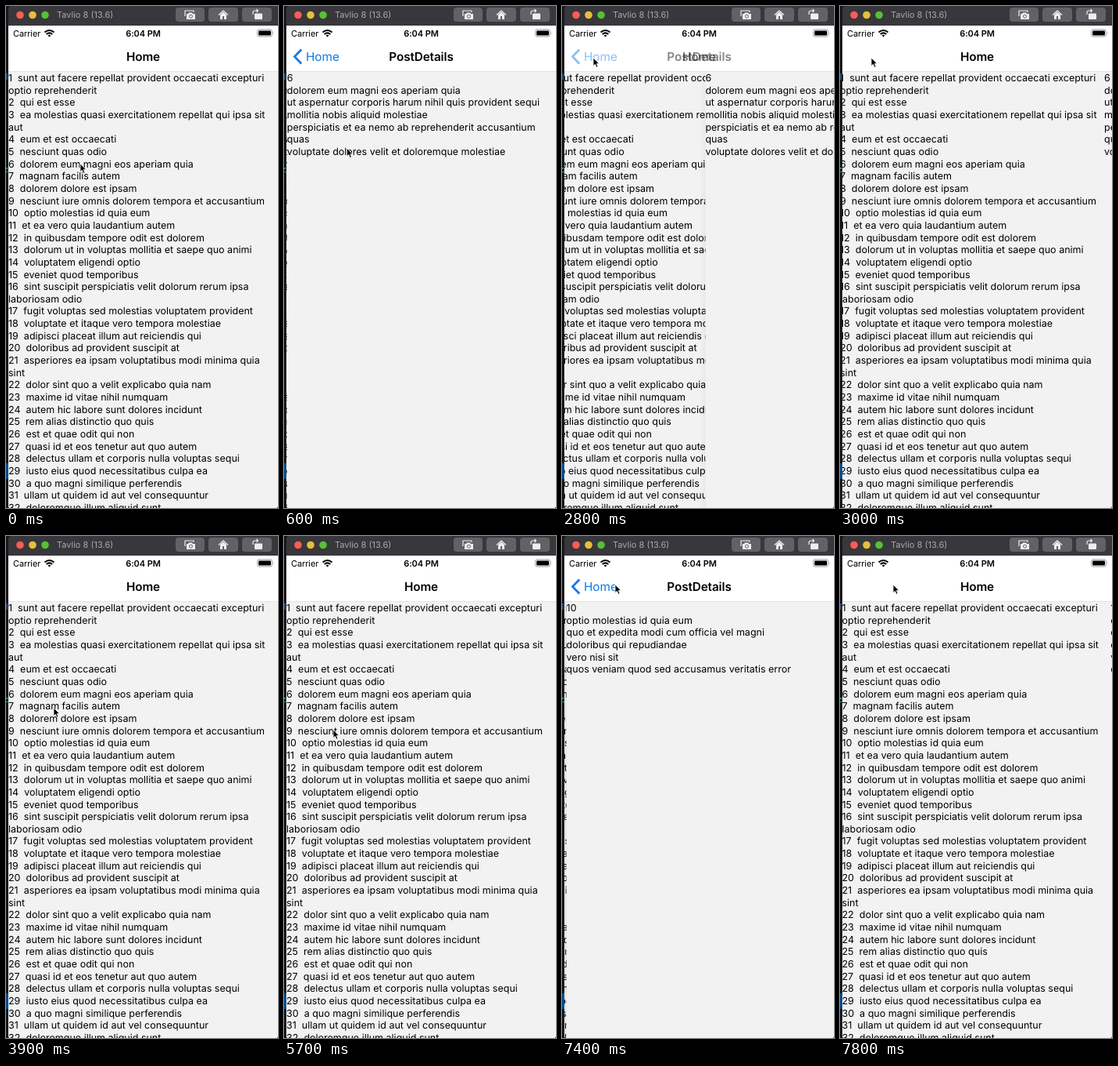
An HTML page that plays this animation: 348x640 px, repeating every 7900 ms.

```html
<!DOCTYPE html>
<html lang="en">
<head>
<meta charset="utf-8">
<style>
  html, body { margin: 0; width: 100%; height: 100%; overflow: hidden; background: #17181c; }
  #stage { position: relative; width: 348px; height: 640px; overflow: hidden; font: 12.5px/15.65px Inter, "Liberation Sans", sans-serif; color: #000; text-rendering: geometricPrecision; }
  #stage div, #stage svg { position: absolute; }
  #screen { left: 3px; top: 25px; width: 345px; height: 615px; overflow: hidden; background: #f2f2f2; border-radius: 0 0 3px 3px; }
  .page { left: 0; top: 59px; width: 345px; height: 556px; padding-top: 1px; background: #f2f2f2; white-space: pre; }
  #header { left: 0; top: 0; width: 345px; height: 59px; background: #fff; border-bottom: 1px solid #e4e4e4; box-sizing: border-box; }
  .title { left: 0; width: 345px; top: 30px; text-align: center; font-size: 15.3px; line-height: 19px; font-weight: 600; letter-spacing: -.12px; }
  #back { left: 25px; top: 30px; color: #0a7aeb; font-size: 15.3px; line-height: 19px; }
  .status { top: 2px; font-size: 11px; line-height: 16px; letter-spacing: -.1px; }
  #device { left: 65px; top: 4px; font-size: 11px; color: #a9a8ab; white-space: pre; }
</style>
</head>
<body>
<div id="stage">
  <svg width="348" height="640">
    <path fill="#38373b" d="M3 25V4q0-4 4-4H348V25z"/>
    <path fill="#0b4a86" d="M0 583h3v20H0z"/>
    <path fill="#2d8f7c" d="M0 206h2v2H0zM0 211h3v1H0z"/>
    <path fill="#274a70" d="M0 86h2v8H0z"/>
    <circle cx="18" cy="11.5" r="4.8" fill="#fc5b57"/>
    <circle cx="34" cy="11.5" r="4.8" fill="#e5bf3c"/>
    <circle cx="50" cy="11.5" r="4.8" fill="#57c038"/>
    <g fill="#626165">
      <rect x="217" y="2" width="37" height="18" rx="4"/>
      <rect x="259" y="2" width="38" height="18" rx="4"/>
      <rect x="302" y="2" width="38" height="18" rx="4"/>
    </g>
    <g fill="none" stroke="#eee" stroke-width="1.2" stroke-linejoin="round">
      <path d="M229 13V6h11v2M272 11.500l6-5.500 6 5.500M316 11V8.500q0-2.500 2.500-2.500H322M320.500 4l2 2-2 2"/>
    </g>
    <path fill="#eee" d="M274 11l4-3.500 4 3.500v6h-3v-4h-2v4h-3zM319 9.500h8q1 0 1 1v5.500q0 1-1 1h-8q-1 0-1-1v-5.500q0-1 1-1zM231 10h2l1-1.500h4l1 1.500h3v7h-11z"/>
    <circle cx="236.500" cy="13.200" r="2" fill="#eee" stroke="#626165"/>
  </svg>
  <div id="device">Tavlio 8 (13.6)</div>

  <div id="screen">
    <div class="page" id="list"></div>
    <div class="page" id="post"></div>
    <div id="header">
      <div class="status" style="left:6px">Carrier</div>
      <div class="status" style="left:0;width:345px;text-align:center;font-weight:600">6:04 PM</div>
      <svg width="345" height="20">
        <g fill="none" stroke="#000" stroke-width="2">
          <path d="M46.500 8.500q6-5 12 0M48.700 11q3.800-3.200 7.600 0"/>
        </g>
        <path d="M50.500 12.500q2-1.500 4 0l-2 2z"/>
        <rect x="318.500" y="5" width="19" height="9" rx="2.500" fill="none" stroke="#999"/>
        <rect x="320" y="6.500" width="16" height="6" rx="1.300"/>
        <path fill="#999" d="M339 8q1.500 1.500 0 3z"/>
      </svg>
      <div class="title" id="homeTitle">Home</div>
      <div class="title" id="postTitle">PostDetails</div>
      <div id="back">Home
        <svg style="left:-17px;top:-1px" width="14" height="22" fill="none" stroke="#0a7aeb" stroke-width="2.700"><path d="M11.300 1.500L2.500 10.500l8.800 9"/></svg>
      </div>
    </div>
  </div>
  <svg id="cursor" width="12" height="16" style="left:-1px;top:-1px">
    <path d="M1 1v10.500l2.400-2.200 1.700 3.900 1.900-.8-1.700-3.800h3.200z" fill="#000" stroke="#fff" stroke-width=".8"/>
  </svg>
</div>
<script>
const LOOP = 7900, STEP = 100, WIDTH = 345;
const $ = id => document.getElementById(id);

const titles = `sunt aut facere repellat provident occaecati excepturi
optio reprehenderit|qui est esse|ea molestias quasi exercitationem repellat qui ipsa sit
aut|eum et est occaecati|nesciunt quas odio|dolorem eum magni eos aperiam quia|magnam facilis autem|dolorem dolore est ipsam|nesciunt iure omnis dolorem tempora et accusantium|optio molestias id quia eum|et ea vero quia laudantium autem|in quibusdam tempore odit est dolorem|dolorum ut in voluptas mollitia et saepe quo animi|voluptatem eligendi optio|eveniet quod temporibus|sint suscipit perspiciatis velit dolorum rerum ipsa
laboriosam odio|fugit voluptas sed molestias voluptatem provident|voluptate et itaque vero tempora molestiae|adipisci placeat illum aut reiciendis qui|doloribus ad provident suscipit at|asperiores ea ipsam voluptatibus modi minima quia
sint|dolor sint quo a velit explicabo quia nam|maxime id vitae nihil numquam|autem hic labore sunt dolores incidunt|rem alias distinctio quo quis|est et quae odit qui non|quasi id et eos tenetur aut quo autem|delectus ullam et corporis nulla voluptas sequi|iusto eius quod necessitatibus culpa ea|a quo magni similique perferendis|ullam ut quidem id aut vel consequuntur|doloremque illum aliquid sunt`.split('|');

const bodies = {
  6: `ut aspernatur corporis harum nihil quis provident sequi
mollitia nobis aliquid molestiae
perspiciatis et ea nemo ab reprehenderit accusantium
quas
voluptate dolores velit et doloremque molestiae`,
  10: `quo et expedita modi cum officia vel magni
doloribus qui repudiandae
vero nisi sit
quos veniam quod sed accusamus veritatis error`
};
const details = id => `${id}\n${titles[id - 1]}\n${bodies[id]}`;

$('list').textContent = titles.map((text, i) => `${i + 1}  ${text}`).join('\n');

// Pointer stops: time, x, y
const stops = [
  [0, 95, 201], [250, 95, 201], [800, 72, 170], [1600, 61, 115], [1900, 40, 79],
  [2300, 40, 66], [3200, 40, 66], [3900, 61, 219], [4200, 62, 226], [5000, 62, 232],
  [5700, 63, 247], [6200, 66, 262], [6350, 66, 262], [6600, 45, 98], [6900, 64, 66],
  [7200, 68, 62], [LOOP, 68, 62]
];

function pointerAt(t) {
  const i = stops.findIndex(stop => stop[0] > t);
  const [t0, x0, y0] = stops[i - 1], [t1, x1, y1] = stops[i];
  const k = (t - t0) / (t1 - t0);
  return [x0 + (x1 - x0) * k, y0 + (y1 - y0) * k];
}

// Critically damped spring, stiffness 1000 and mass 3
function spring(ms) {
  const u = Math.sqrt(1000 / 3) * Math.max(0, ms) / 1000;
  return u > 9 ? 1 : 1 - (1 + u) * Math.exp(-u);
}

function draw(t) {
  const second = t > 5000;
  const [push, pop] = second ? [6334, 7393] : [150, 2704];
  const open = spring(t - push) - spring(t - pop);
  const fade = Math.min(1, Math.max(0, open * 1.1 - 0.05));
  const id = second ? 10 : 6;
  const post = $('post');
  if (post.dataset.id != id) {
    post.dataset.id = id;
    post.textContent = details(id);
  }
  post.style.transform = `translateX(${WIDTH * (1 - open)}px)`;
  post.style.boxShadow = `-1px 0 8px rgba(0,0,0,${0.14 * open})`;
  $('list').style.transform = `translateX(${-0.3 * WIDTH * open}px)`;
  $('homeTitle').style.opacity = 1 - fade;
  $('postTitle').style.opacity = $('back').style.opacity = fade;
  const [x, y] = pointerAt(t);
  $('cursor').style.transform = `translate(${x}px,${y}px)`;
}

function tick() {
  draw(Math.floor(performance.now() % LOOP / STEP) * STEP);
  requestAnimationFrame(tick);
}
tick();
</script>
</body>
</html>
```
